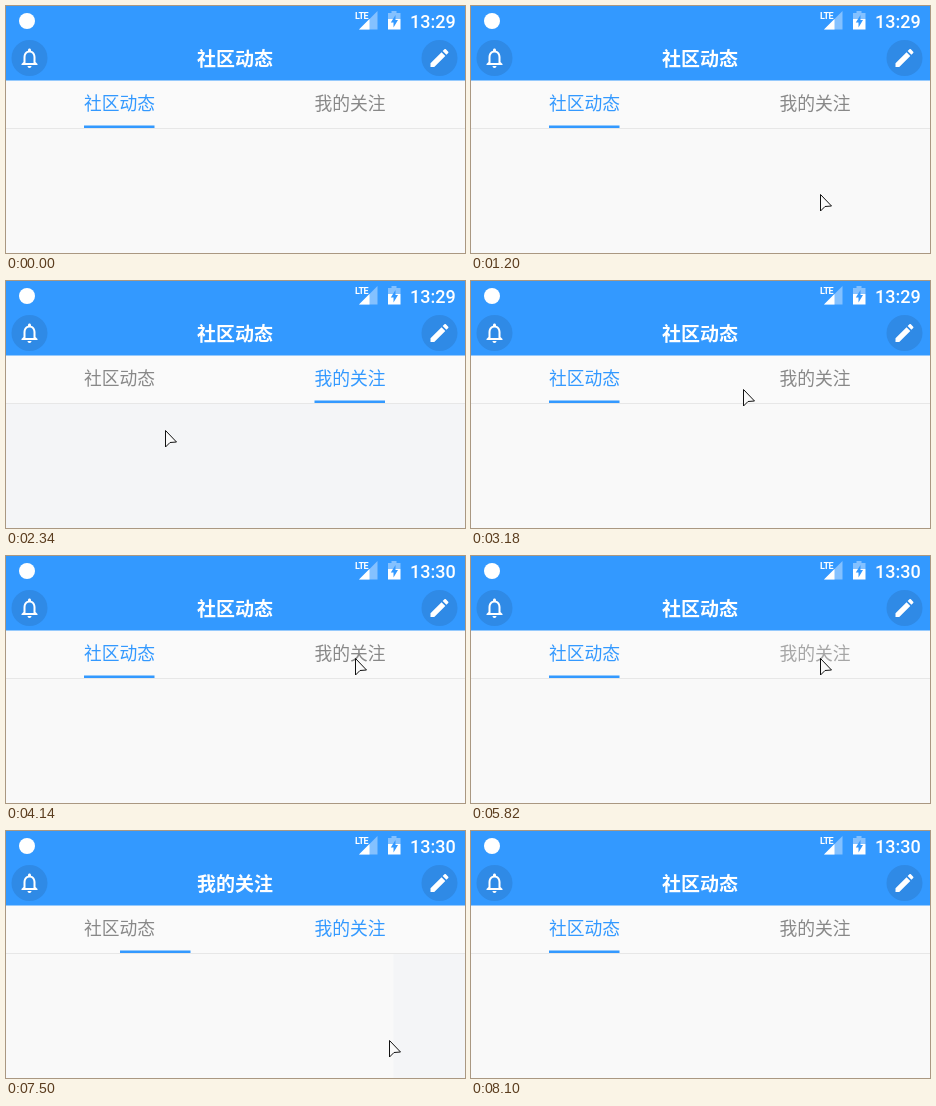
An HTML page with a canvas for the animation above (8640 ms loop, 459 by 247 pixels).

```html
<!DOCTYPE html>
<html lang="zh">
<head>
<meta charset="utf-8">
<style>
  html, body { margin: 0; width: 100%; height: 100%; overflow: hidden; background: #f9f9f9; }
  canvas { display: block; width: 459px; height: 247px; }
</style>
</head>
<body>
<canvas id="stage" width="459" height="247"></canvas>
<script>
const ctx = document.getElementById('stage').getContext('2d');
const W = 459, H = 247, LOOP = 8640, TICK = 60;
const BLUE = '#3399ff', GREY = '#888888';
const CJK = '"Noto Sans CJK SC", "Noto Sans CJK", sans-serif';
const TABS = [{ label: '社区动态', x: 113.5 }, { label: '我的关注', x: 344 }];

const BELL = new Path2D('M12 22c1.1 0 2-.9 2-2h-4c0 1.1.9 2 2 2zm6-6v-5c0-3.07-1.63-5.64-4.5-6.32V4c0-.83-.67-1.5-1.5-1.5s-1.5.67-1.5 1.5v.68C7.64 5.36 6 7.92 6 11v5l-2 2v1h16v-1l-2-2zm-2 1H8v-6c0-2.48 1.51-4.5 4-4.5s4 2.02 4 4.5v6z');
const PENCIL = new Path2D('M3 17.25V21h3.75L17.81 9.94l-3.75-3.75L3 17.25zM20.71 7.04c.39-.39.39-1.02 0-1.41l-2.34-2.34c-.39-.39-1.02-.39-1.41 0l-1.83 1.83 3.75 3.75 1.83-1.83z');

// Pointer stops: [time, x, y]
const ENTER = [[120, 456, 65], [360, 370, 118], [540, 312, 168], [720, 336, 192], [840, 349, 188],
  [1260, 349, 188], [1500, 225, 203], [1800, 6, 216], [2040, 84, 221], [2340, 159, 149],
  [2700, 228, 113], [2880, 228, 113], [3180, 272, 108], [3540, 349, 102],
  [6720, 349, 102], [6960, 205, 196], [7200, 90, 226], [7560, 442, 205], [7860, 446, 210], [8100, 462, 222]];

const clamp = v => Math.max(0, Math.min(1, v));
const ease = v => v * v * (3 - 2 * v);
const ramp = (t, a, b) => ease(clamp((t - a) / (b - a)));
const during = (t, a, b) => t >= a && t < b;

function pagePosition(t) {
  return ramp(t, 1740, 1980) - ramp(t, 2460, 2700) + ramp(t, 5880, 6120) - ramp(t, 7320, 7560);
}
const activeTab = t => +(during(t, 2040, 2880) || during(t, 5940, 7620));
const titleIndex = t => +(during(t, 2400, 2940) || during(t, 6120, 7740));

function pointerAt(t) {
  const i = ENTER.findIndex(stop => stop[0] > t);
  if (i < 1) return null;
  const [t0, x0, y0] = ENTER[i - 1], [t1, x1, y1] = ENTER[i];
  const k = (t - t0) / (t1 - t0);
  return [Math.round(x0 + (x1 - x0) * k), Math.round(y0 + (y1 - y0) * k)];
}

function rect(color, x, y, w, h) {
  ctx.fillStyle = color;
  ctx.fillRect(x, y, w, h);
}

function disc(color, x, y, r) {
  ctx.fillStyle = color;
  ctx.beginPath();
  ctx.arc(x, y, r, 0, Math.PI * 2);
  ctx.fill();
}

function shape(color, points) {
  ctx.fillStyle = color;
  ctx.beginPath();
  points.forEach(([x, y]) => ctx.lineTo(x, y));
  ctx.closePath();
  ctx.fill();
}

function text(label, font, color, x, y, align = 'center') {
  ctx.font = font;
  ctx.fillStyle = color;
  ctx.textAlign = align;
  ctx.fillText(label, x, y);
}

function roundButton(icon, x, y) {
  disc('#2f8ae6', x, 52, 18);
  ctx.save();
  ctx.translate(x - 12, y - 12);
  ctx.fillStyle = '#fff';
  ctx.fill(icon);
  ctx.restore();
}

function statusBar(t) {
  disc('#fff', 21, 15, 8);
  shape('#84c1ff', [[353, 23.5], [371.5, 5], [371.5, 23.5]]);
  shape('#fff', [[353, 23.5], [363.5, 13], [363.5, 23.5]]);
  ctx.letterSpacing = '-0.5px';
  text('LTE', 'bold condensed 9px Roboto, sans-serif', '#fff', 349, 13, 'left');
  ctx.letterSpacing = '0px';

  rect('#84c1ff', 385.5, 5, 5, 3);
  rect('#84c1ff', 382, 7, 12.5, 6);
  rect('#fff', 382, 13, 12.5, 10.5);
  shape(BLUE, [[389.5, 9], [384.8, 16.5], [387.5, 16.5], [387.5, 21.5], [392, 14], [389.5, 14]]);
  text(t < 4140 ? '13:29' : '13:30', '500 18px Roboto, sans-serif', '#fff', 404, 22, 'left');
}

function header(t) {
  rect(BLUE, 0, 0, W, 74.5);
  statusBar(t);
  roundButton(BELL, 23.5, 52);
  roundButton(PENCIL, 433.5, 52);
  text(TABS[titleIndex(t)].label, 'bold 19px ' + CJK, '#fff', 229, 60);
}

function tabBar(t, position) {
  rect('#fafafa', 0, 74.5, W, 47.5);
  rect('#e7e7e7', 0, 122, W, 1);
  TABS.forEach(({ label, x }, i) => {
    const pressed = i === 1 && during(t, 5820, 5940);
    const color = i === activeTab(t) ? BLUE : pressed ? '#a6a6a6' : GREY;
    text(label, '17.8px ' + CJK, color, x, 103.5);
  });
  const x = TABS[0].x + (TABS[1].x - TABS[0].x) * position;
  rect(BLUE, x - 35.5, 119.5, 70.5, 2.5);
}

function pointer(t) {
  const at = pointerAt(t);
  if (!at) return;
  ctx.save();
  ctx.translate(at[0] + 0.5, at[1] + 0.5);
  shape('#fafafa', [[0, 0], [0, 16.5], [4.5, 12], [11, 11.5]]);
  ctx.strokeStyle = '#111';
  ctx.lineWidth = 1;
  ctx.stroke();
  ctx.restore();
}

function draw(t) {
  const position = pagePosition(t);
  rect('#f9f9f9', 0, 0, W, H);
  rect('#f4f5f7', W * (1 - position), 123, W, H - 123);
  tabBar(t, position);
  header(t);
  pointer(t);
}

const start = performance.now();
function loop() {
  const t = (performance.now() - start) % LOOP;
  draw(Math.floor(t / TICK) * TICK);
  requestAnimationFrame(loop);
}
loop();
</script>
</body>
</html>
```
